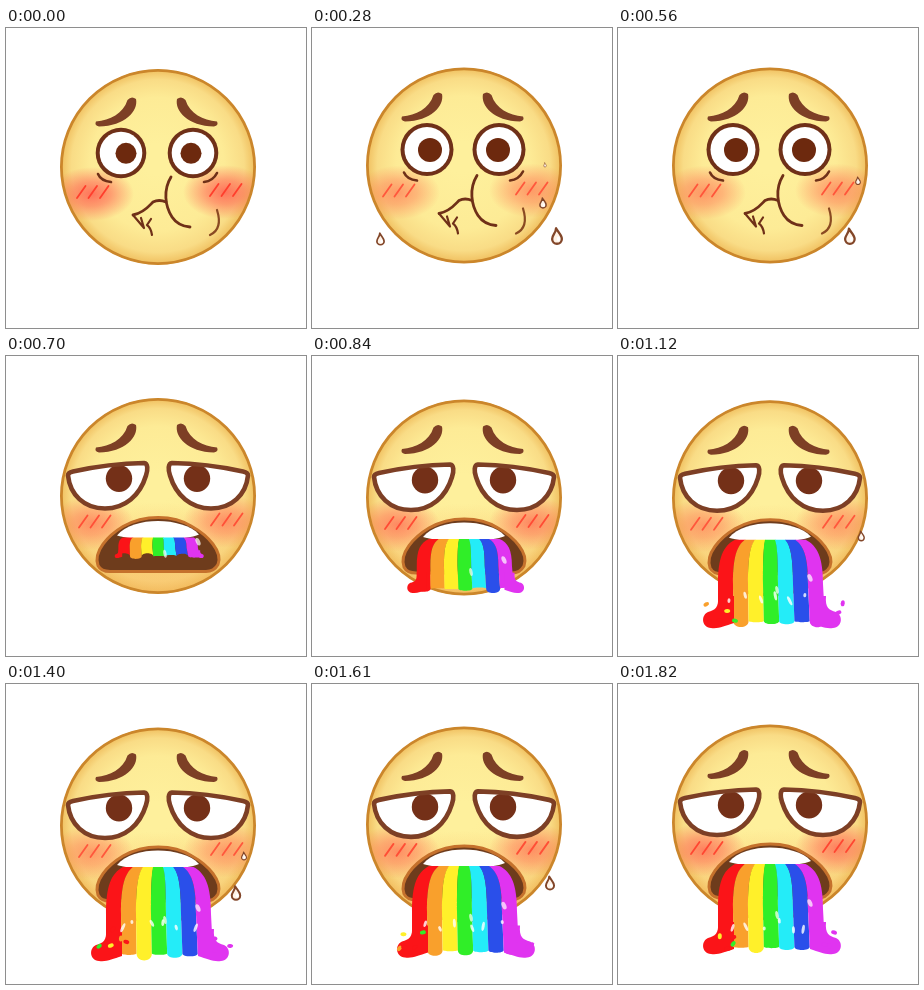
These frames come from a looping animation (300x300 px, 1.89 s). An HTML page with a canvas:

```html
<!DOCTYPE html>
<html>
<head>
<meta charset="utf-8">
<style>
html, body { margin: 0; width: 100%; height: 100%; overflow: hidden; background: #fff; }
canvas { display: block; width: 300px; height: 300px; }
</style>
</head>
<body>
<canvas id="stage" width="300" height="300"></canvas>
<script>
const g = document.getElementById('stage').getContext('2d');
const LOOP = 1890, STEP = 70, OPEN = 700;
const BROWN = '#6f3018', BROW = '#7d3f25';
const COLORS = ['#fb1418', '#f9a02c', '#fff02a', '#30ee28', '#24ecf8', '#2a4fea', '#e034f0'];

const mix = (a, b, k) => a + (b - a) * k;
const clamp = v => Math.max(0, Math.min(1, v));

// Piecewise linear value from [time, value] pairs.
function track(keys, t) {
  for (let i = 1; i < keys.length; i++) {
    const [t0, a] = keys[i - 1], [t1, b] = keys[i];
    if (t <= t1) return mix(a, b, clamp((t - t0) / (t1 - t0)));
  }
  return keys[keys.length - 1][1];
}

const BOB = [[0, 139], [140, 137.5], [560, 137.5], [700, 140], [840, 141.5],
  [1120, 142.3], [1400, 141.5], [1680, 140], [1820, 138.5]];
const FLUSH = [[0, 1], [210, .5], [560, .55], [840, .75], [1120, .5], [1400, .5], [1820, .85]];
const FALL = [[700, 202], [840, 237], [980, 267], [1120, 272], [1400, 277], [1820, 270]];

// start, end, x0, y0, x1, y1, height at both ends
const DROPS = [
  [140, 420, 72, 194, 65, 228, 8, 15],
  [140, 420, 245, 180, 245, 236, 12, 19],
  [280, 600, 231, 175, 232, 213, 10, 16],
  [280, 600, 233, 137, 241, 155, 4, 8],
  [1050, 1330, 244, 171, 241, 207, 8, 14],
  [1260, 1540, 231, 184, 229, 234, 10, 17],
  [1330, 1610, 238, 163, 238, 199, 6, 13]
];

function stroke(d, color, width) {
  g.strokeStyle = color;
  g.lineWidth = width;
  g.stroke(new Path2D(d));
}

function fill(d, color) {
  g.fillStyle = color;
  g.fill(typeof d === 'string' ? new Path2D(d) : d);
}

function oval(x, y, rx, ry, color, turn = 0) {
  g.beginPath();
  g.ellipse(x, y, rx, ry, turn, 0, 7);
  g.fillStyle = color;
  g.fill();
}

// Draws a part, then its reflection where x and sum - x swap places.
function mirrored(sum, part) {
  part();
  g.save();
  g.translate(sum, 0);
  g.scale(-1, 1);
  part();
  g.restore();
}

function random(seed) {
  const v = Math.sin(seed * 127.1 + 3.7) * 43758.5453;
  return v - Math.floor(v);
}

function glow(x, y, rx, ry, rgb, alpha) {
  g.save();
  g.translate(x, y);
  g.scale(rx, ry);
  const s = g.createRadialGradient(0, 0, 0, 0, 0, 1);
  s.addColorStop(0, `rgba(${rgb},${alpha})`);
  s.addColorStop(.45, `rgba(${rgb},${alpha * .65})`);
  s.addColorStop(1, `rgba(${rgb},0)`);
  oval(0, 0, 1, 1, s);
  g.restore();
}

function head(cy, flush, sick) {
  const s = g.createRadialGradient(150, cy - 8, 15, 152, cy, 98);
  s.addColorStop(0, '#fef09c');
  s.addColorStop(.62, '#fdeb96');
  s.addColorStop(.86, '#f9dc86');
  s.addColorStop(1, '#efbd5c');
  oval(152, cy, 97, 97.5, s);
  g.save();
  g.clip();
  if (sick) glow(152, cy + 68, 100, 62, '248,172,84', .45);
  const red = `255,${Math.round(mix(150, 96, flush))},${Math.round(mix(88, 82, flush))}`;
  glow(86, cy + 27, 42, 27, red, mix(.55, .85, flush));
  glow(219, cy + 25, 42, 27, red, mix(.55, .85, flush));
  g.restore();
  g.beginPath();
  g.arc(152, cy, 96.6, 0, 7);
  g.strokeStyle = '#cb862b';
  g.lineWidth = 2.8;
  g.stroke();
}

function blushLines(left, right, y, flush) {
  const color = `rgb(255,${Math.round(mix(112, 62, flush))},${Math.round(mix(76, 44, flush))})`;
  for (let i = 0; i < 3; i++) {
    for (const x of [left, right]) {
      const top = y - (x === right ? 2 : 0);
      stroke(`M${x + i * 11.5} ${top + 12}l8.5 -12`, color, 1.8);
    }
  }
}

function brows(y) {
  g.save();
  g.translate(0, y);
  mirrored(301, () => fill('M90 21.5C104 20 117 14 121.5 0Q125.5 -4.5 130 -1C132.5 11 119 26 93 26.5Q88 25.5 90 21.5Z', BROW));
  g.restore();
}

function roundEye(x, y, r, px, pr) {
  oval(x, y, r, r, BROWN);
  oval(x, y, r - 4, r - 4, '#fff');
  oval(px, y + .3, pr, pr, '#6d290e');
}

function queasy(t, cy, flush) {
  const k = clamp(t / 140);
  brows(mix(72, 67, k));
  const ey = mix(125, 121.6, k), r = mix(25.3, 26.5, k), pr = mix(10.5, 12, k);
  roundEye(115, ey, r, mix(120, 118, k), pr);
  roundEye(187, ey, r, mix(185, 186, k), pr);
  g.save();
  g.translate(0, cy - 139);
  stroke('M92 146Q95 153 105 154M198 154Q207 153 211 145', BROWN, 2.6);
  blushLines(71, 204, 158, flush);
  stroke('M127 187C138 185 143 178 147 174Q153 171 160 174', BROWN, 2.8);
  stroke('M165 149C157 162 159 178 166 189Q172 198 184 199', BROWN, 2.8);
  stroke('M127 187L138 200L135 190M141 197Q145 200 146 207M141 197L145 191', BROWN, 2.2);
  stroke('M211 182Q217 201 204 207', '#8a4a22', 2.2);
  g.restore();
}

function lidEye() {
  const bowl = new Path2D('M62 121Q62 118 67 117Q103 109 138 108.5C142 109 142 115 140 121C134 141 119 154 99 154C78 154 64 140 62 121Z');
  fill(bowl, '#fff');
  g.save();
  g.clip(bowl);
  oval(113, 124, 13.2, 13.5, '#743018');
  g.restore();
  g.strokeStyle = BROW;
  g.lineWidth = 4.6;
  g.stroke(bowl);
}

function mouth() {
  const d = 'M92 211C87 197 102 181 117 172C138 160 167 160 186 172C202 181 217 197 212 210Q208 217 200 217L104 217Q95 217 92 211Z';
  fill(d, '#6e3c1c');
  stroke(d, '#c5712c', 3);
  fill('M111 181C119 171 136 166.5 152 166.5C168 166.5 185 171 193 180Q184 184.5 152 184.5Q121 184.5 111 181Z', '#fff');
}

// One border between stripes: fans out below the teeth, then drops straight.
function edge(u, len) {
  const top = 117 + 70 * u, topY = 183;
  const mid = mix(top, 100 + 105 * u, clamp(len / 75));
  return {
    top, topY, mid, midY: topY + len * .5,
    near: mix(top, mid, .7), nearY: topY + len * .07, farY: topY + len * .2,
    low: mid + 2 * u, lowY: topY + len * .92
  };
}

function foot(x, bottom, size, side, color) {
  g.save();
  g.translate(x, bottom);
  g.scale(side * size, size);
  fill('M-14 -32L2 -32C1 -20 5 -18 12 -16C19 -13 19 -1 9 0C1 1 -4 -2 -14 -5Z', color);
  g.restore();
}

function stream(t, bottom) {
  const len = bottom - 183, sway = t / 140;
  COLORS.forEach((color, i) => {
    const a = edge(i / 7, len), b = edge((i + 1) / 7, len);
    const end = bottom + 2 - 8 * Math.abs(Math.sin(i * 1.3 + sway));
    const p = new Path2D();
    p.moveTo(a.top, a.topY);
    p.bezierCurveTo(a.near, a.nearY, a.mid, a.farY, a.mid, a.midY);
    p.lineTo(a.low, a.lowY);
    p.bezierCurveTo(a.low, end, b.low, end, b.low, b.lowY);
    p.lineTo(b.mid, b.midY);
    p.bezierCurveTo(b.mid, b.farY, b.near, b.nearY, b.top + .6, b.topY);
    p.closePath();
    fill(p, color);
  });
  const size = clamp(len / 85);
  foot(edge(0, len).low + 2 * size, bottom, size, -1, COLORS[0]);
  foot(edge(1, len).low - 1 * size, bottom, size, 1, COLORS[6]);
  g.save();
  g.globalAlpha = .7;
  const tip = 183 + len * .5;
  oval(192, tip - 6, 2.2, 4, '#fff', -.4);
  oval(159, tip + 6, 1.6, 4, '#fff', -.2);
  g.restore();
}

function splash(t) {
  const n = Math.round(t / STEP);
  for (let i = 0; i < 6; i++) {
    const x = 110 + i * 15 + 7 * random(n + i * 13);
    const y = 236 + 10 * random(n * 3 + i * 7);
    oval(x, y, 1.5, 2 + 3 * random(n + i), 'rgba(255,255,255,.8)', random(n * 5 + i) - .5);
  }
  for (let i = 0; i < 8; i++) {
    const left = i < 5;
    const x = left ? 87 + 34 * random(n + i * 5) : 200 + 27 * random(n + i * 9);
    const y = 245 + 22 * random(n * 2 + i * 11);
    oval(x, y, 2, 3, COLORS[left ? i % 4 : 6], random(i + n) * 2);
  }
}

function vomit(t, cy, flush) {
  const dy = cy - 141.5;
  g.save();
  g.translate(0, dy);
  brows(71.5);
  mirrored(304, lidEye);
  blushLines(73, 205, 161, flush);
  mouth();
  stream(t, track(FALL, t) - dy);
  g.restore();
  if (t >= 980) splash(t);
}

function drop([t0, t1, x0, y0, x1, y1, h0, h1], t) {
  if (t < t0 || t > t1) return;
  const k = (t - t0) / (t1 - t0), h = mix(h0, h1, k);
  g.save();
  g.translate(mix(x0, x1, k), mix(y0, y1, k));
  g.scale(h / 16, h / 16);
  const d = 'M-1 -8C-1 -3 -5 -1 -5 3A5 5 0 0 0 5 3C5 -1 1 -4 -1 -8Z';
  fill(d, '#fff2e6');
  stroke(d, '#824629', 2.4);
  oval(1.5, 3, 1.6, 2.4, '#fff');
  g.restore();
}

function draw(t) {
  g.fillStyle = '#fff';
  g.fillRect(0, 0, 300, 300);
  g.lineCap = g.lineJoin = 'round';
  const cy = track(BOB, t), flush = track(FLUSH, t), sick = t >= OPEN;
  head(cy, flush, sick);
  (sick ? vomit : queasy)(t, cy, flush);
  DROPS.forEach(d => drop(d, t));
}

const start = performance.now();
function tick() {
  const t = (performance.now() - start) % LOOP;
  draw(Math.floor(t / STEP) * STEP);
  requestAnimationFrame(tick);
}
tick();
</script>
</body>
</html>
```
